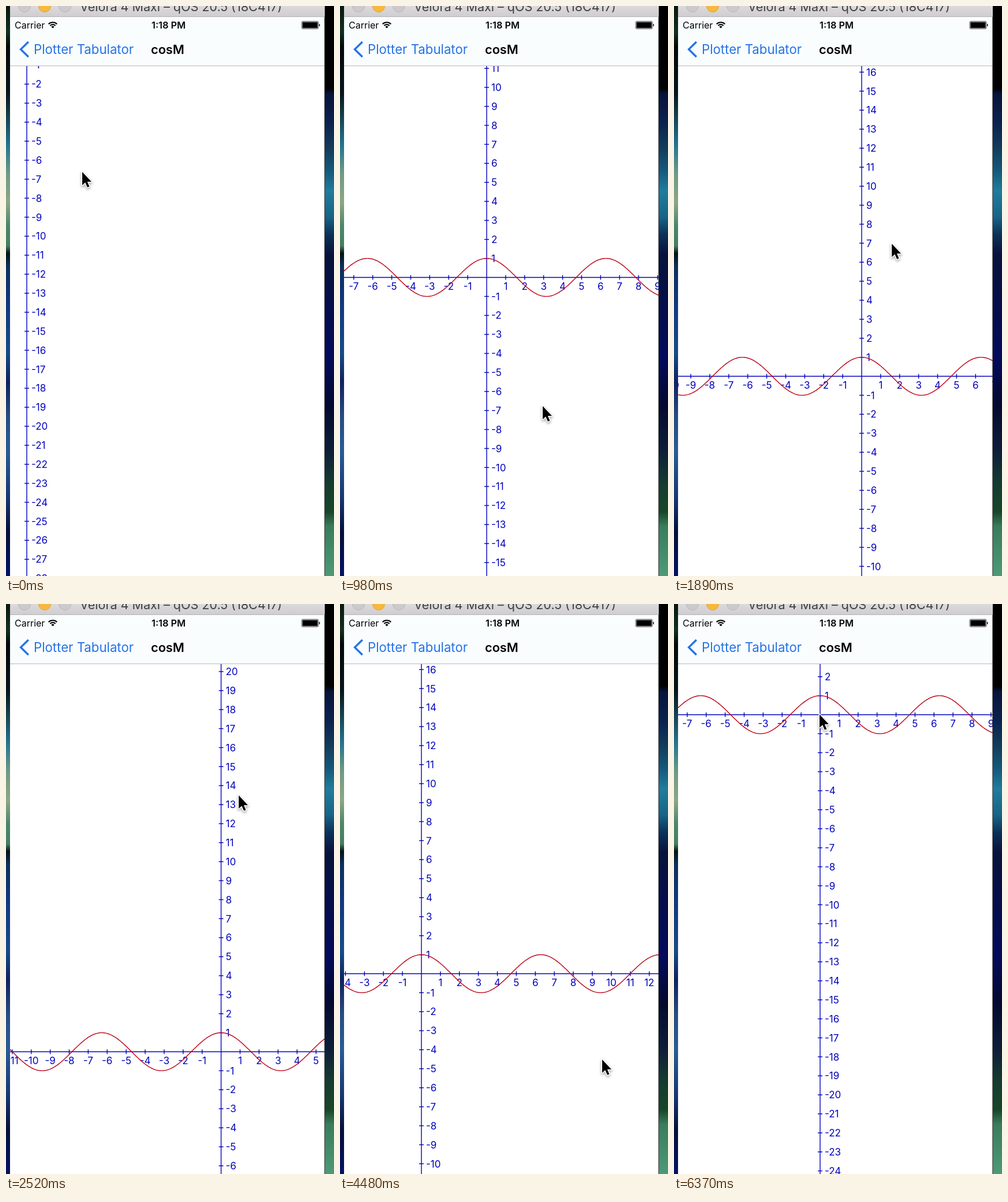
Animation of 568 by 986 pixels, one loop 6.44 s. Source, as an HTML page with a canvas:

```html
<!DOCTYPE html>
<html lang="en">
<head>
<meta charset="utf-8">
<title>Cosine graph</title>
<style>
  html, body { margin: 0; width: 100%; height: 100%; overflow: hidden; background: #000; }
  canvas { display: block; }
</style>
</head>
<body>
<canvas id="stage" width="568" height="986"></canvas>
<script>
const W = 568, H = 986, LOOP = 6440, STEP = 70;
const LEFT = 7, RIGHT = 552, NAV_TOP = 19, NAV_BOTTOM = 104;
const UNIT = 32.88;
const INK = '#0000be', CURVE = '#bd0016', LINK = '#2472e6';
const ctx = document.getElementById('stage').getContext('2d');

// Keys are [time, x, y, eased?]; the flag eases the way into that key.
const originKeys = [
  [0, 36, 69.4], [560, 184.5, 326], [980, 254, 469.5], [1540, 325, 640.5],
  [2100, 325, 640.5], [2520, 372.5, 774.5, true], [2950, 372.5, 774.5],
  [3500, 222, 714, true], [3950, 222, 714], [4480, 141, 639.5, true],
  [6090, 141, 639.5], [6091, 253, 191.5], [LOOP, 253, 191.5]
];
const cursorKeys = [
  [0, 132, 287], [560, 283, 548], [980, 351, 692], [1540, 424, 874],
  [2100, 355.5, 197, true], [2520, 403, 331, true], [2950, 480, 700, true],
  [3500, 330, 640, true], [3950, 535, 863, true], [4480, 454, 788, true],
  [4900, 454, 788], [5900, 252, 191, true], [LOOP, 252, 191]
];

function at(keys, t) {
  let i = 1;
  while (i < keys.length - 1 && keys[i][0] < t) i++;
  const [t0, x0, y0] = keys[i - 1], [t1, x1, y1, eased] = keys[i];
  let k = (t - t0) / (t1 - t0);
  if (eased) k = k * k * (3 - 2 * k);
  return [x0 + (x1 - x0) * k, y0 + (y1 - y0) * k];
}

function font(size, weight = 400) {
  ctx.font = `${weight} ${size}px Inter, "Open Sans", sans-serif`;
}

function text(str, x, y, size, color, weight, align = 'left') {
  font(size, weight);
  ctx.fillStyle = color;
  ctx.textAlign = align;
  ctx.fillText(str, x, y);
}

function box(x, y, w, h, color) {
  ctx.fillStyle = color;
  ctx.fillRect(x, y, w, h);
}

function line(points, color, width) {
  ctx.strokeStyle = color;
  ctx.lineWidth = width;
  ctx.beginPath();
  points.forEach(([x, y]) => ctx.lineTo(x, y));
  ctx.stroke();
}

function disc(x, y, r, fill, edge) {
  ctx.beginPath();
  ctx.arc(x, y, r, 0, Math.PI * 2);
  ctx.fillStyle = fill;
  ctx.fill();
  ctx.strokeStyle = edge;
  ctx.lineWidth = 1;
  ctx.stroke();
}

function fade(y0, y1, stops) {
  const g = ctx.createLinearGradient(0, y0, 0, y1);
  stops.forEach(([y, color]) => g.addColorStop((y - y0) / (y1 - y0), color));
  return g;
}

const leftFade = fade(0, H, [
  [0, '#0a1710'], [45, '#123020'], [70, '#04080a'], [150, '#07161c'],
  [195, '#174653'], [240, '#247490'], [290, '#6f9a83'], [340, '#8da683'],
  [380, '#4c8669'], [415, '#467e62'], [428, '#071313'], [450, '#0d315a'],
  [520, '#123982'], [600, '#174c88'], [650, '#10235f'], [710, '#274d82'],
  [770, '#295c96'], [850, '#183773'], [910, '#061037'], [H, '#031267']
]);
const rightFade = fade(0, H, [
  [0, '#000'], [142, '#010103'], [152, '#07133a'], [205, '#0b234f'],
  [245, '#123c5b'], [285, '#14597b'], [320, '#207c9d'], [365, '#176486'],
  [395, '#0c3159'], [430, '#07133c'], [520, '#050d4b'], [610, '#030b5b'],
  [690, '#04092f'], [770, '#0d1e38'], [825, '#153b30'], [875, '#184629'],
  [900, '#397c5c'], [H, '#4d9a77']
]);
const titleFade = fade(0, NAV_TOP, [[0, '#dbd9db'], [NAV_TOP, '#cfcdcf']]);

function drawAxes(ox, oy) {
  ctx.lineCap = 'butt';
  line([[ox, NAV_BOTTOM], [ox, H]], INK, 1.4);
  line([[LEFT, oy], [RIGHT, oy]], INK, 1.4);

  const firstX = Math.floor((LEFT - ox) / UNIT) - 1;
  const lastX = Math.ceil((RIGHT - ox) / UNIT) + 1;
  for (let n = firstX; n <= lastX; n++) {
    if (!n) continue;
    const x = ox + n * UNIT;
    line([[x, oy - 4], [x, oy + 4]], INK, 1.4);
    text(String(n), x, oy + 21, 17, INK, 400, 'center');
  }

  const firstY = Math.floor((oy - H) / UNIT) - 1;
  const lastY = Math.ceil((oy - NAV_BOTTOM) / UNIT) + 1;
  for (let n = firstY; n <= lastY; n++) {
    if (!n) continue;
    const y = oy - n * UNIT;
    line([[ox - 4, y], [ox + 4, y]], INK, 1.4);
    text(String(n), ox + 8, y + 6.2, 17, INK);
  }
}

function drawGraph(ox, oy) {
  ctx.save();
  ctx.beginPath();
  ctx.rect(LEFT, NAV_BOTTOM, RIGHT - LEFT, H - NAV_BOTTOM);
  ctx.clip();
  box(LEFT, NAV_BOTTOM, RIGHT - LEFT, H - NAV_BOTTOM, '#fff');
  drawAxes(ox, oy);
  const points = [];
  for (let x = LEFT; x <= RIGHT; x++) {
    points.push([x, oy - UNIT * Math.cos((x - ox) / UNIT)]);
  }
  line(points, CURVE, 1.4);
  ctx.restore();
}

function drawWifi(x, y) {
  ctx.strokeStyle = '#000';
  ctx.lineWidth = 2.1;
  [6.5, 10.3].forEach(r => {
    ctx.beginPath();
    ctx.arc(x, y, r, -Math.PI * 0.75, -Math.PI * 0.25);
    ctx.stroke();
  });
  ctx.beginPath();
  ctx.moveTo(x, y);
  ctx.arc(x, y, 3.7, -Math.PI * 0.75, -Math.PI * 0.25);
  ctx.fillStyle = '#000';
  ctx.fill();
}

function drawBattery() {
  ctx.strokeStyle = '#222';
  ctx.lineWidth = 0.8;
  ctx.beginPath();
  ctx.roundRect(512, 26.5, 29, 13, 2);
  ctx.stroke();
  box(513.3, 27.8, 26.4, 10.4, '#000');
  box(542, 31, 1.5, 4, '#222');
}

function drawBars() {
  box(LEFT, 0, RIGHT - LEFT, NAV_TOP, titleFade);
  box(LEFT, NAV_TOP - 1, RIGHT - LEFT, 1, '#b5b3b5');
  disc(32, 0, 10.5, '#cccacc', '#b7b5b7');
  disc(67, 0, 10.5, '#f7b83d', '#e2a535');
  disc(102, 0, 10.5, '#cccacc', '#b7b5b7');
  text('Velora 4 Maxi – qOS 20.5 (18C417)', 128, 9, 21.5, '#403f41');

  box(LEFT, NAV_TOP, RIGHT - LEFT, NAV_BOTTOM - NAV_TOP, '#f9fdfe');
  box(LEFT, NAV_BOTTOM - 1, RIGHT - LEFT, 1, '#b4b8ba');
  text('Carrier', 15, 39, 16, '#000');
  drawWifi(81, 38.5);
  text('1:18 PM', 281.5, 39, 16.3, '#000', 600, 'center');
  drawBattery();
  line([[38.8, 62], [25.5, 75], [38.8, 88]], LINK, 3.3);
  text('Plotter Tabulator', 48, 83, 22.2, LINK);
  text('cosM', 251, 83, 21.7, '#000', 600);
}

function drawCursor(x, y) {
  ctx.save();
  ctx.translate(x, y);
  ctx.beginPath();
  [[0, 0], [0, 23], [5.2, 18.2], [9, 26.8], [12.4, 25.3], [8.8, 17], [16, 17]]
    .forEach(([px, py]) => ctx.lineTo(px, py));
  ctx.closePath();
  ctx.lineJoin = 'round';
  ctx.shadowColor = 'rgba(0,0,0,.4)';
  ctx.shadowBlur = 4;
  ctx.shadowOffsetY = 2;
  ctx.strokeStyle = '#fff';
  ctx.lineWidth = 3;
  ctx.stroke();
  ctx.shadowColor = 'transparent';
  ctx.fillStyle = '#000';
  ctx.fill();
  ctx.restore();
}

function draw(t) {
  box(0, 0, LEFT, H, leftFade);
  box(RIGHT, 0, W - RIGHT, H, rightFade);
  drawGraph(...at(originKeys, t));
  drawBars();
  box(RIGHT - 0.6, NAV_TOP, 0.9, H - NAV_TOP, '#222');
  drawCursor(...at(cursorKeys, t));
}

const start = performance.now();
function tick() {
  const t = (performance.now() - start) % LOOP;
  draw(Math.floor(t / STEP) * STEP);
  requestAnimationFrame(tick);
}
tick();
</script>
</body>
</html>
```
